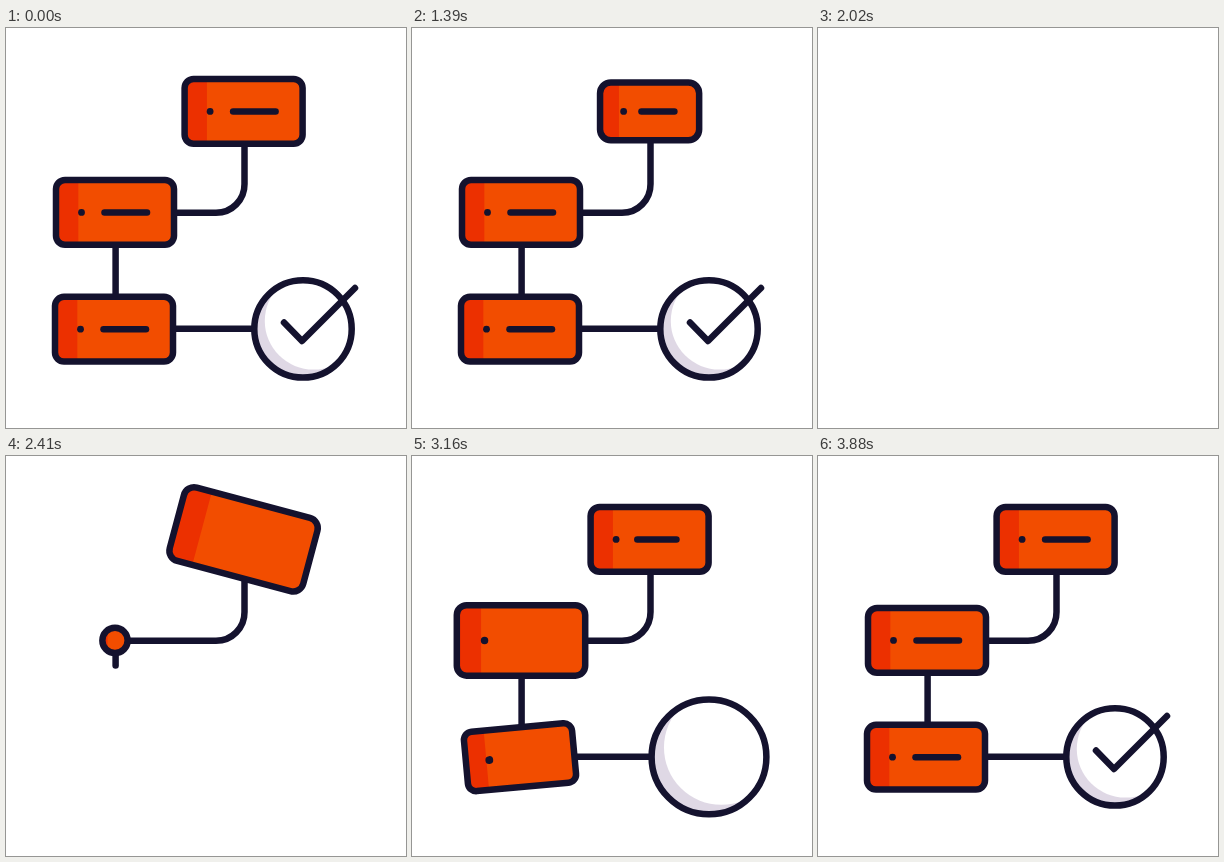
These frames come from a looping animation (400 by 400 pixels, 3.91 s). An HTML page:

```html
<!DOCTYPE html>
<html lang="en">
<head>
<meta charset="utf-8">
<title>Flow chart</title>
<style>
  html, body { margin: 0; width: 100%; height: 100%; overflow: hidden; background: #fff; }
  svg { display: block; width: 100vw; height: 100vh; }
  .ink { stroke: #14122e; stroke-width: 6.5; stroke-linecap: round; stroke-linejoin: round; fill: none; }
</style>
</head>
<body>
<svg id="stage" viewBox="0 0 400 400"></svg>
<script>
const LOOP = 3910;
const SWITCH = 2100; // everything is hidden around this time
const stage = document.getElementById('stage');

function add(parent, name, attrs = {}) {
  const el = document.createElementNS('http://www.w3.org/2000/svg', name);
  set(el, attrs);
  parent.appendChild(el);
  return el;
}
function set(el, attrs) {
  for (const key in attrs) el.setAttribute(key, attrs[key]);
}
function show(el, on) {
  el.style.display = on ? '' : 'none';
}
const clamp = x => Math.max(0, Math.min(1, x));
const mix = (a, b, x) => a + (b - a) * x;

// Smooth curve through [time, value] keys, flat at the peaks and both ends.
function track(...keys) {
  const rise = i => (keys[i + 1][1] - keys[i][1]) / (keys[i + 1][0] - keys[i][0]);
  const slopes = keys.map((_, i) => {
    if (i === 0 || i === keys.length - 1) return 0;
    const a = rise(i - 1), b = rise(i);
    return a * b > 0 ? 2 * a * b / (a + b) : 0;
  });
  return t => {
    if (t <= keys[0][0]) return keys[0][1];
    const i = keys.findIndex(key => key[0] >= t) - 1;
    if (i < 0) return keys[keys.length - 1][1];
    const [t0, v0] = keys[i], [t1, v1] = keys[i + 1];
    const d = t1 - t0, x = (t - t0) / d, y = 1 - x;
    return v0 * (1 + 2 * x) * y * y + v1 * x * x * (3 - 2 * x)
      + d * (slopes[i] * x * y * y - slopes[i + 1] * x * x * y);
  };
}

const leave = {
  scale: track([1515, 1], [1540, 0.6], [1578, 0]),
  morph: t => 1 - clamp((t - 1270) / 255) ** 2
};
const enter = {
  scale: track([2130, 0], [2213, 0.76], [2245, 1], [2410, 1.17], [2440, 1.2],
    [2690, 0.87], [2885, 1.12], [3110, 1]),
  morph: track([2235, 0], [2385, 1]),
  turn: track([2235, 0], [2400, 15], [2630, 8], [2740, -5.3], [2830, -0.7], [2900, 0]),
  dot: track([2660, 0], [2730, 1.15], [2960, 1.1], [3100, 1]),
  bar: track([2975, 0], [3160, 0.92], [3260, 1])
};

function makeLine(d, out, back) {
  const el = add(stage, 'path', { d, class: 'ink', pathLength: 1 });
  const start = track([out[0], 0], [out[1], 1]);
  const end = track([back[0], 0], [back[1], 1]);
  return t => t < SWITCH ? trim(el, start(t), 1) : trim(el, 0, end(t));
}
function trim(el, from, to) {
  show(el, to - from > 0.005);
  set(el, { 'stroke-dasharray': `${to - from} 2`, 'stroke-dashoffset': -from });
}

function makeCard(id, cx, cy, leaveLag, enterLag) {
  const group = add(stage, 'g');
  const clip = add(add(group, 'clipPath', { id }), 'rect');
  const body = add(group, 'rect', { fill: '#f24d00' });
  const strip = add(group, 'rect', { fill: '#ec3000', 'clip-path': `url(#${id})` });
  const frame = add(group, 'rect', { class: 'ink' });
  const dot = add(group, 'circle', { fill: '#14122e', cy: 0 });
  const bar = add(group, 'line', { class: 'ink', y1: 0, y2: 0 });

  return t => {
    const leaving = t < SWITCH;
    const time = t - (leaving ? leaveLag : enterLag);
    const motion = leaving ? leave : enter;
    const k = motion.scale(time), p = motion.morph(time);
    const dotSize = leaving ? 1 : enter.dot(time);
    const barSize = leaving ? 1 : enter.bar(time);
    show(group, k > 0.01);

    const w = mix(34, 118, p) * k, h = mix(34, 64.8, p) * k;
    const box = { x: -w / 2, y: -h / 2, width: w, height: h, rx: mix(17, 9, p) * k };
    for (const el of [clip, body, frame]) set(el, box);
    set(strip, {
      x: -w / 2, y: -h / 2, height: h,
      width: Math.max(0, mix(-10, -36.7, p) * k + w / 2)
    });

    const unit = k * p, dotX = -33.5 * unit;
    set(dot, { cx: dotX, r: 3.4 * dotSize });
    set(bar, { x1: dotX + 23 * unit * barSize, x2: dotX + 65.5 * unit * barSize });
    show(bar, barSize > 0.01);
    const turn = leaving ? 0 : enter.turn(time);
    set(group, { transform: `translate(${cx} ${cy}) rotate(${turn})` });
  };
}

function makeGoal(cx, cy) {
  const group = add(stage, 'g');
  const clip = add(add(group, 'clipPath', { id: 'goal' }), 'circle', { cx, cy });
  const shade = add(group, 'circle', { cx, cy, fill: '#dfd8e5' });
  const light = add(group, 'circle', { fill: '#fff', 'clip-path': 'url(#goal)' });
  const ring = add(group, 'circle', { cx, cy, class: 'ink' });
  const tick = add(stage, 'path', { d: 'M278 294.5 L296 313 L349 260', class: 'ink', pathLength: 1 });
  const grow = track([2745, 0], [2830, 0.42], [3020, 1.35], [3160, 1.18],
    [3290, 0.93], [3480, 1.04], [3690, 1]);
  const draw = track([3300, 0], [3690, 1]);

  return t => {
    const leaving = t < SWITCH;
    const k = leaving ? 1 - clamp((t - 1570) / 450) ** 2 : grow(t);
    const r = 48.7 * k;
    show(group, k > 0.01);
    for (const el of [clip, shade, ring]) set(el, { r });
    set(light, { cx: cx + 10.5 * k, cy: cy - 8 * k, r });
    trim(tick, 0, leaving ? 1 - clamp((t - 1540) / 380) ** 2 : draw(t));
  };
}

const parts = [
  makeLine('M238.5 84 V156 A28.5 28.5 0 0 1 210 184.8 H109.5', [1530, 1650], [2200, 2345]),
  makeLine('M109.6 184.5 V300.5', [1655, 1775], [2360, 2530]),
  makeLine('M109 300.7 H297', [1775, 1895], [2590, 2740]),
  makeCard('first', 237.6, 83.4, 0, 0),
  makeCard('second', 109, 184.4, 120, 200),
  makeCard('third', 108, 301.2, 240, 415),
  makeGoal(297, 300.9)
];

const begin = performance.now();
function render() {
  const t = (performance.now() - begin) % LOOP;
  for (const update of parts) update(t);
  requestAnimationFrame(render);
}
render();
</script>
</body>
</html>
```
